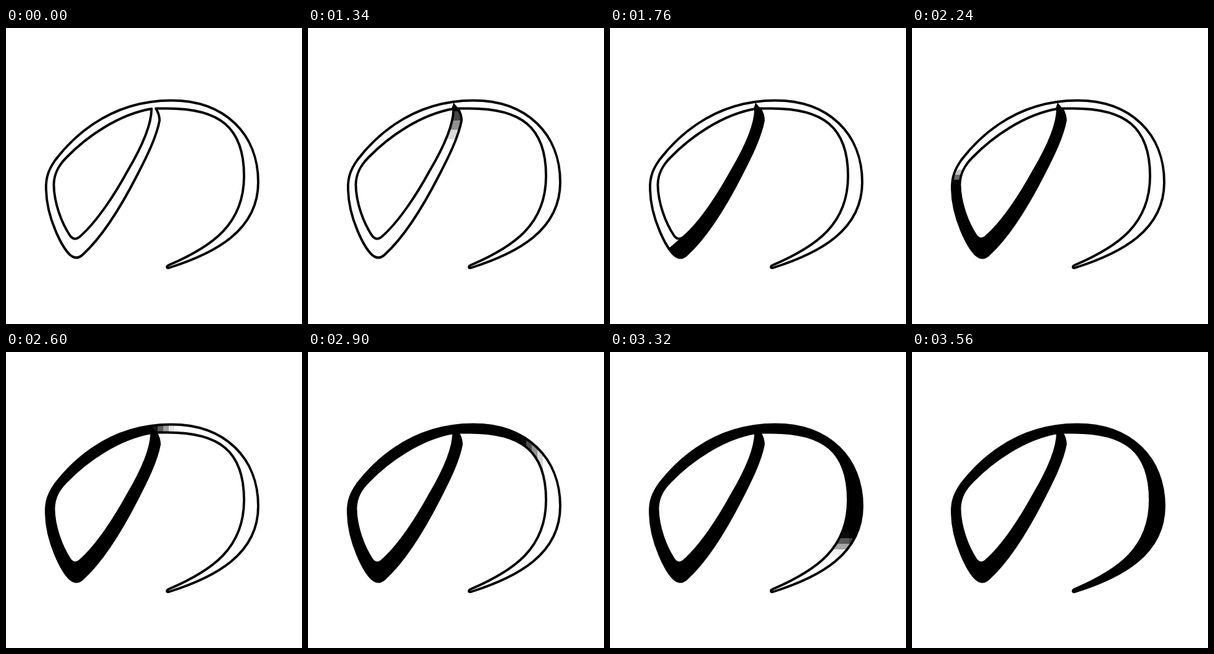
An HTML page with a canvas that plays this animation: 480 by 480 pixels, repeating every 4.83 s.

```html
<!DOCTYPE html>
<html lang="ja">
<head>
<meta charset="utf-8">
<title>Brush stroke</title>
<style>
  html, body { margin: 0; width: 100%; height: 100%; overflow: hidden; background: #fff; }
  canvas { display: block; width: 480px; height: 480px; }
</style>
</head>
<body>
<canvas id="stage" width="480" height="480"></canvas>
<script>
const ctx = document.getElementById('stage').getContext('2d');
const LOOP = 4830, START = 1340, STEP = 60;

const glyph = new Path2D(
  // outer edge
  'M243 130.5 C247 137 249 143 249 150 C244 177 228 209 213 238' +
  'C190 283 160 335 125 367 C118 374 111 374 104 368' +
  'C92 357 66 310 65 262 C64 240 71 227 80 214' +
  'C100 188 160 117.5 268 117.5 C355 117.5 409 172 409 250' +
  'C409 328 340 365 264 389 C260 390 260 386 264 384.5' +
  'C335 354 386 318 386 240 C386 160 345 130.5 262 130.5 Z' +
  // enclosed counter
  'M236 131 C236 160 216 200 197 232 C178 267 148 314 119 339' +
  'C114 343 109 343 104 337 C90 316 78 284 77.5 254' +
  'C78 235 86 222 98 210 C130 177 182 140 236 131 Z');

const downstroke = new Path2D(
  'M236 121 L248 135 L260 150 L260 260 L130 385 L105 380 L92 360' +
  'L118 338 L150 260 L232 134 Z');

// Each wipe: box [x, y, w, h], axis and direction, first step, step when full,
// initial reach, advance per step, soft edge length, cell size.
const wipes = [
  { box: [88, 120, 168, 270], axis: 'y', dir: 1, from: 0, full: 7,
    reach: 60, rate: 36, soft: 52, cw: 8, ch: 15, region: downstroke },
  { box: [52, 246, 96, 126], axis: 'y', dir: -1, from: 8, full: 14,
    reach: 22, rate: 22, soft: 24, cw: 8, ch: 8 },
  { box: [52, 100, 185, 146], axis: 'y', dir: -1, from: 15, full: 21,
    reach: 18, rate: 25, soft: 24, cw: 8, ch: 8 },
  { box: [237, 112, 180, 127], axis: 'x', dir: 1, from: 21, full: 29,
    reach: 35, rate: 22, soft: 34, cw: 9, ch: 9 },
  { box: [253, 239, 162, 162], axis: 'y', dir: 1, from: 30, full: 37,
    reach: 27, rate: 22, soft: 30, cw: 9, ch: 9, tilt: 397 }
];

const clamp = (v, lo, hi) => Math.min(hi, Math.max(lo, v));

function drawWipe(p, step) {
  const n = step - p.from;
  if (n < 0) return;
  const [x, y, w, h] = p.box;
  ctx.save();
  ctx.clip(glyph, 'evenodd');
  if (p.region) ctx.clip(p.region);
  ctx.beginPath();
  ctx.rect(x, y, w, h);
  ctx.clip();
  if (step >= p.full) {
    ctx.fillRect(x, y, w, h);
  } else {
    const reach = p.reach + p.rate * n;
    for (let u = 0; u < w; u += p.cw) {
      for (let v = 0; v < h; v += p.ch) {
        const along = p.axis === 'x' ? u + p.cw / 2 : v + p.ch / 2;
        const lean = p.tilt ? clamp((x + u + p.cw / 2 - p.tilt) / 45, -0.2, 0.2) : 0;
        const alpha = clamp((reach - along) / p.soft + lean, 0, 1);
        if (!alpha) continue;
        ctx.globalAlpha = alpha;
        const top = p.dir > 0 ? y + v : y + h - v - p.ch;
        ctx.fillRect(x + u, top, p.cw, p.ch);
      }
    }
  }
  ctx.restore();
}

function draw(time) {
  const step = Math.floor((time % LOOP - START) / STEP);
  ctx.fillStyle = '#fff';
  ctx.fillRect(0, 0, 480, 480);
  ctx.fillStyle = ctx.strokeStyle = '#000';
  if (step >= 37) ctx.fill(glyph, 'evenodd');
  else wipes.forEach(p => drawWipe(p, step));
  ctx.lineWidth = 3.9;
  ctx.lineJoin = 'round';
  ctx.stroke(glyph);
}

const begin = performance.now();
function tick() {
  draw(performance.now() - begin);
  requestAnimationFrame(tick);
}
tick();
</script>
</body>
</html>
```
